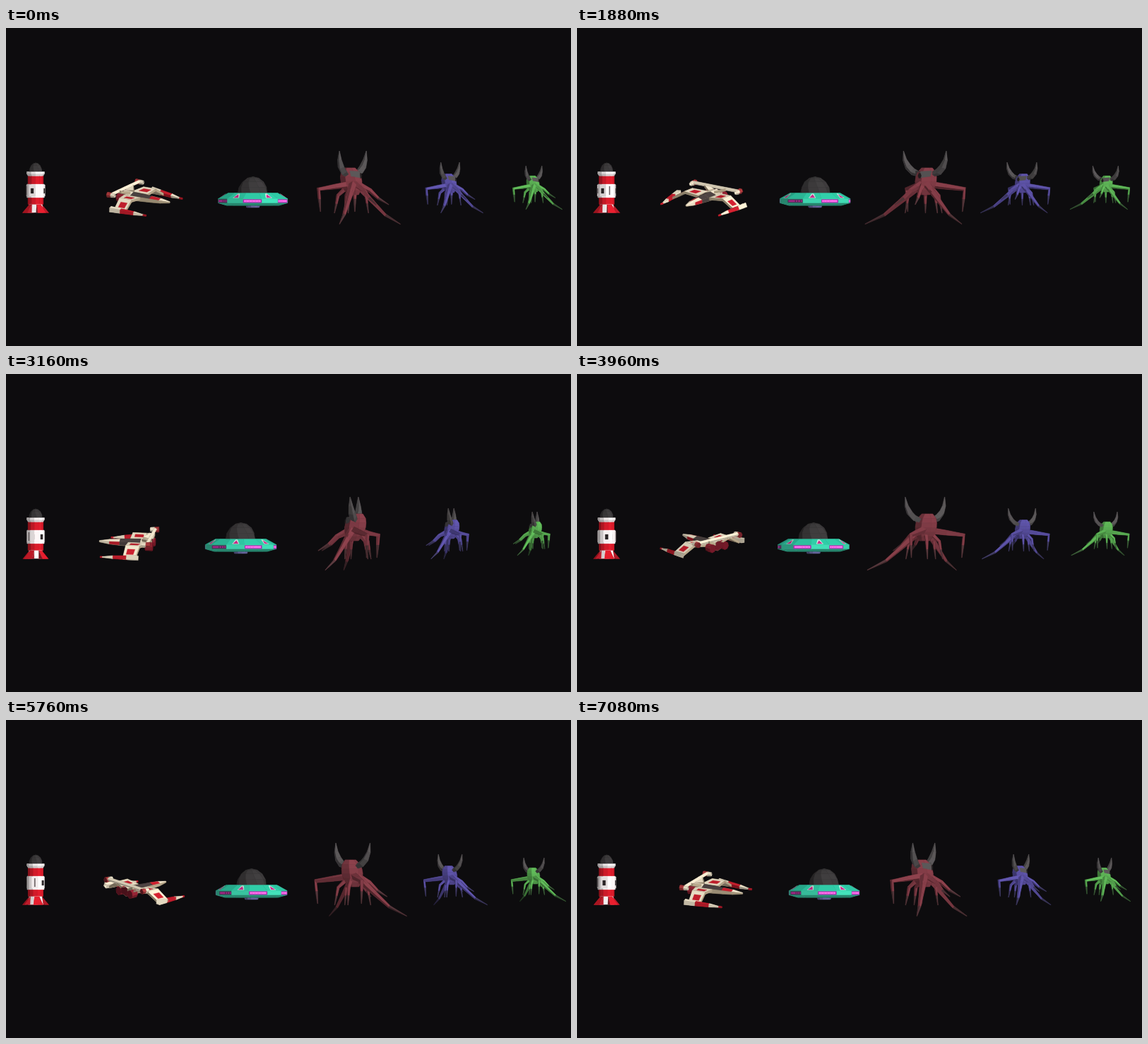
These frames come from a looping animation (800x450 px, 7.12 s). An HTML page with a canvas:

```html
<!DOCTYPE html>
<html lang="en">
<head>
<meta charset="utf-8">
<title>Turntable</title>
<style>
html, body { margin: 0; width: 100%; height: 100%; overflow: hidden; background: #0d0c0e; }
canvas { display: block; width: 800px; height: 450px; }
</style>
</head>
<body>
<canvas id="stage" width="800" height="450"></canvas>
<script>
const ctx = document.getElementById('stage').getContext('2d');
const LOOP = 7120, STEP = 40, SPIN = 0.05, MID = 226;
const RAD = Math.PI / 180;
const LIGHT = [0.45, -0.45, 0.77];

const rgb = h => [1, 3, 5].map(i => parseInt(h.slice(i, i + 2), 16));
const range = (n, fn) => Array.from({ length: n }, (_, i) => fn(i));
const sub = (a, b) => a.map((v, i) => v - b[i]);
const dot = (a, b) => a[0] * b[0] + a[1] * b[1] + a[2] * b[2];
const cross = (a, b) => [a[1] * b[2] - a[2] * b[1], a[2] * b[0] - a[0] * b[2], a[0] * b[1] - a[1] * b[0]];
const norm = a => { const l = Math.hypot(...a) || 1; return a.map(v => v / l); };
const mix = (a, b, k) => a.map((v, i) => v + (b[i] - v) * k);
const polar = (deg, r, y) => [r * Math.sin(deg * RAD), y, r * Math.cos(deg * RAD)];
const ring = (n, phase, r, y) => range(n, j => polar(phase + j * 360 / n, r, y));

// Models use x to the right, y down in stage pixels, z towards the viewer.
class Model {
  constructor() { this.faces = []; }
  face(pts, color, bias = 0, dim = null) {
    this.faces.push({ pts, color: rgb(color), bias, dim: dim && rgb(dim) });
  }
  skin(rings, color) {
    for (let i = 0; i + 1 < rings.length; i++) {
      const a = rings[i], b = rings[i + 1], n = a.length;
      for (let j = 0; j < n; j++) {
        const k = (j + 1) % n;
        this.face([a[j], a[k], b[k], b[j]], typeof color === 'function' ? color(i, j) : color);
      }
    }
  }
  band(n, phase, r0, y0, r1, y1, color) {
    this.skin([ring(n, phase, r0, y0), ring(n, phase, r1, y1)], color);
  }
  dome(n, r, base, height, color) {
    this.skin(range(5, i => {
      const a = i * 22.5 * RAD;
      return ring(n, i * 8, r * Math.sin(a), base - height * Math.cos(a));
    }), color);
  }
  tube(path, radius, color, n = 4) {
    const last = path.length - 1;
    const rings = path.map((p, i) => {
      const t = sub(path[Math.min(i + 1, last)], path[Math.max(i - 1, 0)]);
      const u = norm(cross(t, [0.31, 0.22, 0.92])), v = norm(cross(t, u)), r = radius(i / last);
      return range(n, j => {
        const c = Math.cos(j * 2 * Math.PI / n) * r, s = Math.sin(j * 2 * Math.PI / n) * r;
        return p.map((w, k) => w + u[k] * c + v[k] * s);
      });
    });
    this.skin(rings, color);
    return rings;
  }
  slab(q, color, under, thick) {
    const low = q.map(p => [p[0], p[1] + thick, p[2]]);
    this.face(q, color);
    this.face(low, under);
    this.skin([q, low], under);
  }
  patch(q, u0, u1, v0, v1, color, bias, dim) {
    const at = (u, v) => mix(mix(q[0], q[1], u), mix(q[3], q[2], u), v);
    this.face([at(u0, v0), at(u1, v0), at(u1, v1), at(u0, v1)], color, bias, dim);
  }
  plate(a, half, r, y0, y1, color, bias) {
    this.face([polar(a - half, r, y0), polar(a + half, r, y0), polar(a + half, r, y1), polar(a - half, r, y1)], color, bias);
  }
}

function makeRocket() {
  const m = new Model(), white = '#f6f0f0', red = '#d41c2a', sides = 12;
  m.dome(8, 9.5, 204, 13, '#3a3839');
  m.band(sides, 0, 12.5, 203.5, 12.5, 206, white);
  m.band(sides, 0, 12.5, 206, 10.5, 209.5, white);
  m.band(sides, 0, 10.8, 209, 10.8, 221, red);
  m.band(sides, 0, 12.2, 221, 12.2, 240, white);
  m.band(sides, 0, 10.8, 240, 10.8, 249.5, red);
  m.band(sides, 0, 9, 249, 11, 261, white);
  for (const a of [-22, 68, 198]) {
    m.plate(a, 20, 13.2, 222, 238, white, 1.5);
    m.plate(a, 9, 13.4, 227, 234, '#2c2728', 2.5);
  }
  for (const a of [112, 283]) {
    m.plate(a, 20, 13.2, 222, 238, white, 1.5);
    m.plate(a, 2.5, 13.4, 224, 236, '#5a5052', 2.5);
  }
  for (let a = 30; a < 390; a += 90) {
    m.face([polar(a - 22, 9, 250), polar(a + 22, 9, 250), polar(a + 21, 18.8, 261.5), polar(a - 21, 18.8, 261.5)], red, 1);
    for (const s of [-1, 1]) {
      m.face([polar(a + s * 22, 9, 250), polar(a + s * 21, 18.8, 261.5), polar(a + s * 26, 10, 261)], '#b01a28', 1);
    }
  }
  return m;
}

function makeShip() {
  const m = new Model(), cream = '#eadfc6', tan = '#b9a98c', red = '#c41f2d';
  const hull = range(6, i => {
    const u = i / 5, w = 1 + 10.5 * Math.sqrt(u), h = 1 + 5.5 * Math.sqrt(u), z = 54 - 75 * u;
    return range(6, j => {
      const a = (j * 60 - 150) * RAD;
      return [w * Math.cos(a), 239 + h * Math.sin(a), z];
    });
  });
  m.skin(hull, (i, j) => j > 2 ? tan : (i === 2 || i === 3) && j < 3 ? '#4a4140' : i === 1 && j !== 1 ? red : cream);
  m.face(hull[5], '#6e1a28');
  for (const s of [-1, 1]) {
    const e = (x, y, z) => [s * x, y, z];
    const chord = (x, y, half, mid) => [e(x, y, mid + half), e(x, y, mid - half)];
    const root = chord(10, 236, 13, -2), knee = chord(33, 234, 10, 1), end = chord(53, 245, 9, 3);
    for (const [a, b] of [[root, knee], [knee, end]]) {
      const q = [a[0], b[0], b[1], a[1]];
      m.slab(q, cream, tan, 3);
      m.patch(q, 0.3, 0.75, 0.2, 0.75, red, 2);
    }
    m.tube([e(57, 244, -10), e(55, 245, 6), e(52, 246, 26), e(50, 247, 42)],
      k => 0.6 + 3.6 * Math.sqrt(1 - k), i => i === 1 ? red : cream);
    m.tube([e(50, 247, 40), e(50, 247, 45)], () => 1.1, red);
    const jet = m.tube([e(12, 240, -14), e(12, 240, -24)], () => 5.6, '#8e2231', 8);
    m.face(jet[1], '#741a29', 1);
    m.slab([e(5, 232, -8), e(17, 229, -16), e(17, 229, -23), e(5, 234, -22)], cream, tan, 3);
    m.tube([e(0, 229.5, -20), e(18, 229.5, -20), e(38, 229.5, -20)], () => 2.4, cream);
    const pod = m.tube([e(39, 230, -25), e(39, 230, -19), e(39, 230, -13)], k => 3.6 - k, i => i ? cream : '#a83a3c', 6);
    m.face(pod[0], '#74222b');
  }
  return m;
}

function makeSaucer() {
  const m = new Model(), rim = 50.5, sides = 12, turn = 14;
  m.dome(9, 21.5, 235, 24.5, '#3b393a');
  m.band(sides, turn, 36, 233.5, rim, 241.5, '#2fc8a4');
  m.band(sides, turn, rim, 241.5, rim, 247.5, '#3fd6b0');
  m.band(sides, turn, rim, 247.5, 38, 251, '#3fd6b0');
  m.band(sides, turn, 38, 251, 10, 251, '#2b8a78');
  m.band(sides, turn, 10, 251, 9, 254, '#6a68a0');
  for (let a = -1; a < 359; a += 60) {
    const b = a + 30;
    const q = [polar(a - 15, rim, 242), polar(a + 15, rim, 242), polar(a + 15, rim, 247.5), polar(a - 15, rim, 247.5)];
    m.patch(q, 0, 1, 0.1, 0.95, '#a81ea4', 2, '#3c3048');
    m.patch(q, 0.05, 0.95, 0.3, 0.74, '#ff78f0', 3, '#a02a86');
    for (let i = 1; i < 6; i++) m.patch(q, i / 6 - 0.012, i / 6 + 0.012, 0.3, 0.74, '#ec62de', 4, '#343040');
    m.face([polar(b - 6, 47, 240.4), polar(b + 6, 47, 240.4), polar(b + 2, 38.5, 234.5), polar(b - 2, 38.5, 234.5)], '#c8e8dc', 2);
    m.face([polar(b - 4.5, 46.5, 240), polar(b + 4.5, 46.5, 240), polar(b, 40, 235.5)], '#c62a86', 3);
  }
  // The body sits slightly off the axis it turns around.
  const off = polar(65, 9, 0);
  for (const f of m.faces) f.pts = f.pts.map(p => [p[0] + off[0], p[1], p[2] + off[2]]);
  return m;
}

function makeBeast(skin, tip) {
  const m = new Model(), horn = '#545152';
  m.skin(range(7, i => {
    const k = i / 6, r = 15.5 * Math.pow(Math.sin((0.16 + 0.74 * k) * Math.PI), 0.6);
    return ring(7, 12, i ? r : 8, 198 + 38 * k).map(p => [p[0], p[1], p[2] - 6 * (1 - k)]);
  }), skin);
  m.face(ring(7, 12, 8, 198).map(p => [p[0], p[1], p[2] - 6]), skin);

  const limb = (s, angle, kneeOut, kneeY, footOut, footY, thick) => {
    const knee = polar(s * angle, kneeOut, kneeY), foot = polar(s * angle, footOut, footY);
    const shin = mix(knee, foot, 0.45);
    shin[1] += (footOut - kneeOut) * 0.08;
    const path = [polar(s * angle, 5, 221), mix(polar(s * angle, 5, 221), knee, 0.5), knee, shin, foot];
    m.tube(path, k => 0.3 + thick * Math.pow(1 - k, 0.8), i => i === 3 ? tip : skin);
  };
  for (const s of [-1, 1]) {
    limb(s, 72, 36, 246, 88, 277.5, 5.2);
    limb(s, 20, 24, 230, 51, 250, 4.6);
    limb(s, 119, 57, 228, 54, 260, 4.6);
    limb(s, 148, 22, 237, 27, 262, 3.4);
    limb(s, 74, 24, 236, 29, 262, 3);
    m.tube(range(5, i => {
      const k = i / 4;
      return [s * (13 + 24 * Math.sin(k * Math.PI / 2)), 206.5 - 32.5 * Math.pow(k, 1.7), -4 + 3 * k];
    }), k => 0.2 + 4.9 * Math.sin(Math.PI * (0.25 + 0.75 * k)), horn);
    m.face([[s * 14, 202, 2], [0, 203, 10], [0, 212, 11], [s * 13, 210, 4]], horn, 2);
  }
  m.face(range(6, i => [3 * Math.cos(i * 60 * RAD), 209 + 4 * Math.sin(i * 60 * RAD), 12]), '#282325', 3);
  return m;
}

const cast = [
  { model: makeRocket(), x: 42, yaw: 0, size: 1, tilt: 0 },
  { model: makeShip(), x: 185.5, yaw: 59, size: 1, tilt: 0.28 },
  { model: makeSaucer(), x: 341.5, yaw: 0, size: 1, tilt: 0 },
  { model: makeBeast('#7f3b45', '#53363a'), x: 492, yaw: 59, size: 1, tilt: 0 },
  { model: makeBeast('#594f9f', '#403b62'), x: 629.5, yaw: 59, size: 0.692, tilt: 0 },
  { model: makeBeast('#5aac53', '#3c5e39'), x: 748, yaw: 59, size: 0.595, tilt: 0 }
];

function drawModel({ model, x, yaw, size, tilt }, turn) {
  const c = Math.cos((yaw - turn) * RAD), s = Math.sin((yaw - turn) * RAD);
  const place = ([px, py, pz]) => {
    const z = pz * c - px * s, y = py - MID;
    return [px * c + pz * s, y + z * tilt, z * Math.sqrt(1 - tilt * tilt) - y * tilt];
  };
  const list = model.faces.map(f => {
    const pts = f.pts.map(place), n = pts.length;
    const side = n === 3 ? sub(pts[1], pts[0]) : sub(pts[n - 1], pts[1]);
    let normal = norm(cross(sub(pts[2], pts[0]), side));
    if (normal[2] < 0) normal = normal.map(v => -v);
    const depth = pts.reduce((sum, p) => sum + p[2], 0) / n + f.bias;
    return { f, pts, depth, lit: Math.max(0, dot(normal, LIGHT)) };
  }).sort((a, b) => a.depth - b.depth);
  ctx.lineWidth = 0.3;
  ctx.lineJoin = 'round';
  for (const { f, pts, lit } of list) {
    const base = f.dim && lit < 0.48 ? f.dim : f.color;
    const k = f.dim ? 1 : 0.62 + 0.5 * lit;
    ctx.fillStyle = ctx.strokeStyle = `rgb(${base.map(v => Math.min(255, Math.round(v * k)))})`;
    ctx.beginPath();
    for (const p of pts) ctx.lineTo(x + p[0] * size, MID + p[1] * size);
    ctx.closePath();
    ctx.fill();
    ctx.stroke();
  }
}

function draw() {
  const t = Math.floor(performance.now() % LOOP / STEP) * STEP;
  ctx.fillStyle = '#0d0c0e';
  ctx.fillRect(0, 0, 800, 450);
  for (const item of cast) drawModel(item, t * SPIN);
  requestAnimationFrame(draw);
}
draw();
</script>
</body>
</html>
```
